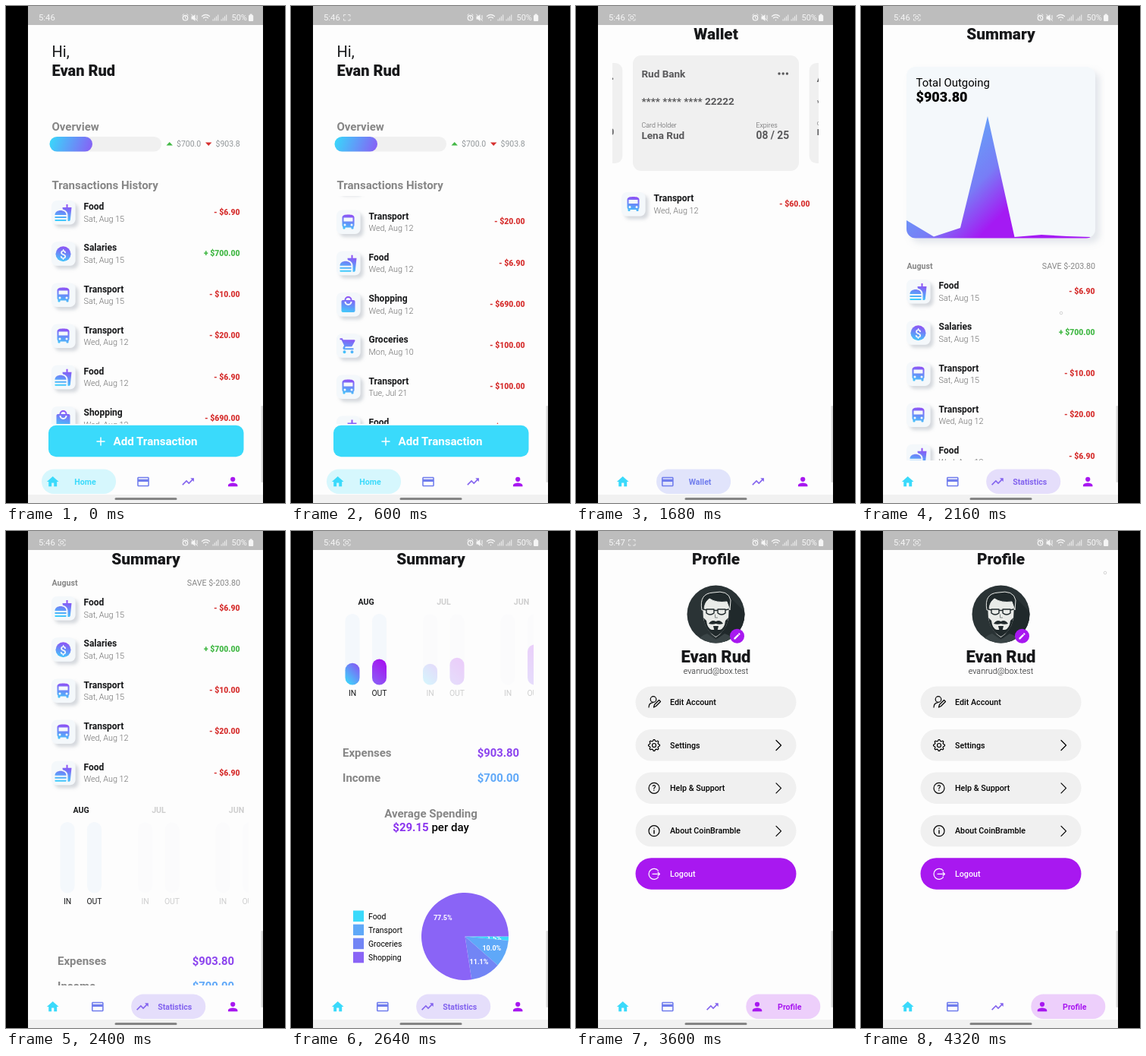
These frames come from a looping animation (368 by 654 pixels, 4.44 s). An HTML page:

```html
<!DOCTYPE html>
<html lang="en">
<head>
<meta charset="utf-8">
<title>Budget app walkthrough</title>
<style>
html, body { margin: 0; width: 100%; height: 100%; overflow: hidden; background: #000; }
svg { display: block; width: 368px; height: 654px; font-family: Roboto, sans-serif; }
text { white-space: pre; }
</style>
</head>
<body>
<svg viewBox="0 0 368 654">
  <defs>
    <linearGradient id="bar" gradientUnits="userSpaceOnUse" x1="57" y1="172" x2="114" y2="191.5"><stop stop-color="#36dcfb"/><stop offset="1" stop-color="#8a5cf5"/></linearGradient>
    <linearGradient id="glyph" gradientUnits="userSpaceOnUse" x1="14" y1="2" x2="10" y2="23"><stop stop-color="#8f4ff5"/><stop offset="1" stop-color="#3fcdfb"/></linearGradient>
    <linearGradient id="in" x1=".1" y1="1" x2=".8" y2="0"><stop stop-color="#3adcfb"/><stop offset="1" stop-color="#8459f4"/></linearGradient>
    <linearGradient id="out" x1=".1" y1="1" x2=".6" y2="0"><stop stop-color="#8a62f6"/><stop offset="1" stop-color="#a515f0"/></linearGradient>
    <linearGradient id="area" gradientUnits="userSpaceOnUse" x1="75" y1="225" x2="155" y2="305"><stop stop-color="#65a3f8"/><stop offset=".55" stop-color="#787df6"/><stop offset="1" stop-color="#a41af3"/></linearGradient>
    <filter id="soft" x="-30%" y="-30%" width="170%" height="170%"><feDropShadow dx="4" dy="4" stdDeviation="2.2" flood-color="#8f98a6" flood-opacity=".36"/></filter>
    <filter id="wide" x="-10%" y="-10%" width="125%" height="125%"><feDropShadow dx="6" dy="6" stdDeviation="4" flood-color="#93a3b5" flood-opacity=".25"/></filter>
    <clipPath id="homeClip"><rect x="48" y="250" width="272" height="300"/></clipPath>
    <clipPath id="rowClip"><rect x="48" y="52" width="272" height="180"/></clipPath>
    <clipPath id="viewClip"><rect x="48" y="52" width="274" height="546"/></clipPath>
    <clipPath id="chartClip"><rect x="60" y="80" width="249" height="225.5" rx="12"/></clipPath>
    <clipPath id="faceClip"><circle cx="184.5" cy="109.5" r="38"/></clipPath>
  </defs>
  <g id="scene"></g>
</svg>
<script>
const LOOP = 4440, STEP = 120;
const CYAN = '#3adafb', BLUE = '#5fa8f8', INDIGO = '#7285f5', VIOLET = '#8a64f6', PURPLE = '#a818f0';
const GRAY = '#868686', INK = '#17181a';
const USER = 'Evan Rud', PARTNER = 'Lena Rud';

const GLYPHS = {
  Home: 'M10 20v-6h4v6h5v-8h3L12 3 2 12h3v8z',
  Wallet: 'M20 4H4c-1.1 0-2 .9-2 2v12c0 1.1.9 2 2 2h16c1.1 0 2-.9 2-2V6c0-1.1-.9-2-2-2zm0 14H4v-6h16zm0-10H4V6h16z',
  Statistics: 'M16 6l2.3 2.3-4.9 4.9-4-4L2 16.6 3.4 18l6-6 4 4 6.3-6.3L22 12V6z',
  Profile: 'M12 12a4 4 0 1 0 0-8 4 4 0 0 0 0 8zm0 2c-2.7 0-8 1.3-8 4v2h16v-2c0-2.7-5.3-4-8-4z',
  Food: 'M18 23h1.7c.8 0 1.5-.6 1.6-1.5L23 5h-5V1h-2v4h-5l.3 2.4c1.7.5 3.3 1.3 4.3 2.3 1.4 1.4 2.4 2.9 2.4 5.3zM1 22v-1h15v1c0 .6-.4 1-1 1H2c-.6 0-1-.4-1-1zm15-7C16 7 1 7 1 15zM1 17h15v2H1z',
  Salaries: 'M12 2a10 10 0 1 0 0 20 10 10 0 0 0 0-20z',
  Transport: 'M4 16c0 .9.4 1.7 1 2.2V20c0 .6.4 1 1 1h1c.6 0 1-.4 1-1v-1h8v1c0 .6.4 1 1 1h1c.6 0 1-.4 1-1v-1.8c.6-.5 1-1.3 1-2.2V6c0-3.5-3.6-4-8-4s-8 .5-8 4zm3.5 1a1.5 1.5 0 1 1 0-3 1.5 1.5 0 0 1 0 3zm9 0a1.5 1.5 0 1 1 0-3 1.5 1.5 0 0 1 0 3zm1.5-6H6V6h12z',
  Groceries: 'M7 18a2 2 0 1 0 0 4 2 2 0 0 0 0-4zM1 2v2h2l3.6 7.6-1.4 2.4c-.7 1.3.3 3 1.8 3h12v-2H7.4l1-2h7.2c.7 0 1.4-.4 1.7-1l3.6-6.5A1 1 0 0 0 20 4H5.2l-.9-2zm16 16a2 2 0 1 0 0 4 2 2 0 0 0 0-4z',
  Shopping: 'M19 6h-2A5 5 0 0 0 7 6H5c-1.1 0-2 .9-2 2v12c0 1.1.9 2 2 2h14c1.1 0 2-.9 2-2V8c0-1.1-.9-2-2-2zm-7-3a3 3 0 0 1 3 3H9a3 3 0 0 1 3-3zm0 10a5 5 0 0 1-5-5h2a3 3 0 0 0 6 0h2a5 5 0 0 1-5 5z',
  edit: 'M3 17.2V21h3.8L17.8 9.9l-3.7-3.7zM20.7 7c.4-.4.4-1 0-1.4l-2.3-2.3c-.4-.4-1-.4-1.4 0l-1.9 1.8 3.8 3.8z'
};

const HISTORY = [
  ['Food', 'Sat, Aug 15', '- $6.90'], ['Salaries', 'Sat, Aug 15', '+ $700.00'],
  ['Transport', 'Sat, Aug 15', '- $10.00'], ['Transport', 'Wed, Aug 12', '- $20.00'],
  ['Food', 'Wed, Aug 12', '- $6.90'], ['Shopping', 'Wed, Aug 12', '- $690.00'],
  ['Groceries', 'Mon, Aug 10', '- $100.00'], ['Transport', 'Tue, Jul 21', '- $100.00'],
  ['Food', 'Mon, Jun 1', '- $100.00']
];
const CARDS = [
  { bank: 'Rud Bank', number: '11111', holder: USER, expires: '08 / 20', rows: [0, 2, 4, 6, 7, 8].map(i => HISTORY[i]) },
  { bank: 'Rud Bank', number: '22222', holder: PARTNER, expires: '08 / 25', rows: [['Transport', 'Wed, Aug 12', '- $60.00']] },
  { bank: 'Arl Bank', number: '33333', holder: PARTNER, expires: '08 / 22', rows: [] }
];
const MONTHS = [
  { name: 'AUG', bars: [51, 60], expenses: '$903.80', income: '$700.00', daily: '$29.15', shares: [1.5, 10, 11.1, 77.5] },
  { name: 'JUL', bars: [49, 63], expenses: '$892.00', income: '$600.00', daily: '$28.77', shares: [5.8, 11.2, 0, 83] },
  { name: 'JUN', bars: [0, 94] }
];
const NAV = [['Home', CYAN], ['Wallet', '#707ded'], ['Statistics', '#8262ee'], ['Profile', PURPLE]];

// Touch marker position by time
const TOUCHES = { 1080: [253, 210], 1200: [220, 190], 2160: [264, 404], 2280: [264, 300],
  2760: [250, 160], 3000: [201, 150], 3360: [289, 620], 4320: [322, 55] };

const seg = (t, from, to) => Math.min(1, Math.max(0, (t - from) / (to - from)));
const ease = p => p * p * (3 - 2 * p);
const text = (x, y, s, size, weight = 400, fill = INK, anchor = 'start') =>
  `<text x="${x}" y="${y}" font-size="${size}" font-weight="${weight}" fill="${fill}" text-anchor="${anchor}">${s}</text>`;
const rect = (x, y, w, h, r, fill, extra = '') =>
  `<rect x="${x}" y="${y}" width="${w}" height="${h}" rx="${r}" fill="${fill}" ${extra}/>`;
const circle = (x, y, r, fill, extra = '') => `<circle cx="${x}" cy="${y}" r="${r}" fill="${fill}" ${extra}/>`;
const path = (d, fill, extra = '') => `<path d="${d}" fill="${fill}" ${extra}/>`;
const line = (d, color, width = 1.2) => path(d, 'none', `stroke="${color}" stroke-width="${width}" stroke-linecap="round" stroke-linejoin="round"`);
const group = (body, attrs) => `<g ${attrs}>${body}</g>`;
const move = (body, x, y, scale = 1) => group(body, `transform="translate(${x} ${y}) scale(${scale})"`);
const clip = (body, id) => group(body, `clip-path="url(#${id})"`);
const icon = (name, x, y, fill, size) => move(path(GLYPHS[name], fill), x - size / 2, y - size / 2, size / 24);
const title = s => text(184.5, 44, s, 20.8, 900, INK, 'middle');

function row([name, date, amount], y) {
  return rect(60, y - 8, 31.5, 31.5, 7, '#f4f8fb', 'filter="url(#soft)"')
    + icon(name, 75.5, y + 8, 'url(#glyph)', 24)
    + (name === 'Salaries' ? text(75.5, y + 13.5, '$', 15.5, 500, '#f4f8fb', 'middle') : '')
    + text(102.5, y + 4.2, name, 12, 700)
    + text(102.5, y + 19.5, date, 10.8, 300, '#6d6d6d')
    + text(308.5, y + 10.8, amount, 10.4, 900, amount[0] === '+' ? '#43b846' : '#d6302f', 'end');
}
const rows = (items, y) => items.map((item, i) => row(item, y + i * 54.2)).join('');

function home(t) {
  const scroll = 150 * ease(seg(t, 120, 480));
  return text(60.5, 67, 'Hi,', 20) + text(60.5, 91.5, USER, 20, 900)
    + text(60.5, 164, 'Overview', 15, 700, GRAY)
    + rect(57.5, 172, 147.5, 19.5, 9.75, '#f0f0f0') + rect(57.5, 172, 56.5, 19.5, 9.75, 'url(#bar)')
    + path('M211.5 183.5l4.2-4.5 4.2 4.5z', '#43b846') + text(225, 185.3, '$700.0', 10.5, 400, '#919699')
    + path('M263 179.5h8.4l-4.2 4.5z', '#d6302f') + text(276.5, 185.3, '$903.8', 10.5, 400, '#919699')
    + text(60.5, 241, 'Transactions History', 15, 700, GRAY)
    + clip(move(rows(HISTORY, 264), 0, -scroll), 'homeClip')
    + rect(56, 551.7, 257.5, 41.5, 10, CYAN)
    + line('M120 573h10M125 568v10', '#fff', 1.5)
    + text(141.5, 578.3, 'Add Transaction', 15.1, 700, '#fff');
}

function bankCard(card, offset) {
  const dark = '#58585a';
  const body = rect(-109.5, -76, 219, 152, 11, '#f0f0f0') + (card
    ? text(-98, -47.5, card.bank, 13.5, 700, dark)
      + [83.5, 88.7, 93.9].map(x => circle(x, -52, 1.7, dark)).join('')
      + text(-98, -11.5, `**** **** **** ${card.number}`, 13.5, 700, dark)
      + text(-98, 18.5, 'Card Holder', 8.9, 300, dark) + text(-98, 33.5, card.holder, 13.5, 700, dark)
      + text(53, 18.5, 'Expires', 8.9, 300, dark) + text(53, 33.5, card.expires, 13.8, 700, dark)
    : '');
  return move(body, 184.5 + offset * 218.5, 141, 1 - 0.13 * Math.min(1, Math.abs(offset)));
}

function wallet(t) {
  const position = ease(seg(t, 1080, 1560));
  const cards = [null, ...CARDS].map((card, i) => bankCard(card, i - 1 - position)).join('');
  return title('Wallet') + clip(cards, 'rowClip') + rows(CARDS[Math.round(position)].rows, 253);
}

const outgoing = () => rect(60, 80, 249, 225.5, 12, '#f4f8fb', 'filter="url(#wide)"')
  + clip(path('M60 282L96 303.5 131 292 167 145 202.5 304 238 301 272 303 303 304V306H60z', 'url(#area)'), 'chartClip')
  + text(72.5, 106, 'Total Outgoing', 14.9, 400, '#000') + text(72.5, 125.5, '$903.80', 18, 900, '#000')
  + text(60.5, 345.5, 'August', 10.6, 700, GRAY) + text(309, 345.5, 'SAVE $-203.80', 10.7, 400, GRAY, 'end')
  + rows(HISTORY.slice(0, 5), 368);

function monthBars(month, x, selected, growth) {
  const bars = month.bars.map((full, i) => {
    const left = x - 27.5 + i * 35.5, h = full * growth;
    return rect(left, 109, 19, 93.5, 9.5, '#f4f8fc')
      + rect(left, 202.5 - h, 19, h, Math.min(9.5, h / 2), `url(#${['in', 'out'][i]})`)
      + text(left + 9.5, 216.5, ['IN', 'OUT'][i], 10.4, 400, INK, 'middle');
  }).join('');
  return group(text(x, 97, month.name, 10.6, 700, INK, 'middle') + bars, `opacity="${selected ? 1 : 0.2}"`);
}

function pie(shares) {
  const cx = 229.5, cy = 533.5, r = 57.5, total = shares.reduce((a, b) => a + b);
  const at = (a, d) => [cx + d * Math.cos(a), cy + d * Math.sin(a)];
  let angle = 0;
  return shares.map((share, i) => {
    if (!share) return '';
    const sweep = share / total * 2 * Math.PI, [lx, ly] = at(angle + sweep / 2, 38.5);
    const d = `M${cx} ${cy}L${at(angle, r)}A${r} ${r} 0 ${+(sweep > Math.PI)} 1 ${at(angle + sweep, r)}z`;
    angle += sweep;
    return path(d, [CYAN, BLUE, INDIGO, VIOLET][i]) + text(lx, ly + 3.2, share.toFixed(1) + '%', 9, 700, '#fff', 'middle');
  }).join('');
}

function breakdown(t) {
  const selected = t < 3120 ? 0 : 1, month = MONTHS[selected];
  const growth = seg(t, 2520, 2732), drag = -70 * Math.sin(Math.PI * seg(t, 2700, 3000));
  const bars = MONTHS.map((m, i) => monthBars(m, 99 + i * 102.5, i === selected, growth)).join('');
  const legend = ['Food', 'Transport', 'Groceries', 'Shopping'].map((name, i) =>
    rect(82, 499.5 + i * 18.1, 14, 14.5, 0, [CYAN, BLUE, INDIGO, VIOLET][i]) + text(102, 510.6 + i * 18.1, name, 10.4, 400, '#000')).join('');
  return clip(move(bars, drag, 0), 'rowClip')
    + text(68, 297, 'Expenses', 15, 700, GRAY) + text(301, 297, month.expenses, 14.8, 700, '#8b43ee', 'end')
    + text(68, 329.5, 'Income', 15, 700, GRAY) + text(301, 329.5, month.income, 14.8, 700, BLUE, 'end')
    + text(184.5, 377, 'Average Spending', 15, 700, GRAY, 'middle')
    + text(184.5, 394.5, `<tspan font-weight="700" fill="#8b35ee">${month.daily}</tspan> per day`, 15, 500, '#000', 'middle')
    + legend + pie(month.shares);
}

function statistics(t) {
  const slide = seg(t, 2280, 2520) * 548;
  return title('Summary') + clip(
    (slide < 548 ? move(outgoing(), 0, -slide) : '') + (slide ? move(breakdown(t), 0, 548 - slide) : ''), 'viewClip');
}

const avatar = () => circle(184.5, 109.5, 38, '#2a3335') + clip(
  path('M200 84L232 116 220 160 184 140z', '#20292b')
  + path('M158 150q2-11 15-15l11.500 8 11.500-8q13 4 15 15z', '#3a4446')
  + path('M167 96q0-13 17.500-13t17.500 13l-1 20q-4 16-16.500 24-12.500-8-16.500-24z', '#e9ebe8')
  + path('M166 104q-4-22 15-23 20-4 23 10l-1 13-4-11q-14 2-23-4-7 5-7 15z', '#20292b', 'stroke="#e9ebe8"')
  + path('M168 114l4 4q1 10 7 12h11q6-2 7-12l4-4q-2 17-16.500 25-14.500-8-16.500-25z', '#20292b')
  + path('M175 122q4-6 9.500-3 5.500-3 9.500 3-5 1.500-9.500 0-4.500 1.500-9.500 0z', '#20292b')
  + path('M181 125h7l-1.500 6h-4z', '#20292b')
  + line('M172 103h10v5q-5 4-10 0zM187 103h10v5q-5 4-10 0zM182 104.500h5M172 104l-4-1M197 104l4-1', '#20292b', 1.4)
  + line('M183.500 110v4h3', '#7b8281', 1), 'faceClip');

const gear = () => 'M' + Array.from({ length: 32 }, (_, i) => {
  const a = (i - 0.5) * Math.PI / 16, r = i % 4 < 2 ? 7.5 : 5.8;
  return [103 + r * Math.cos(a), 282 + r * Math.sin(a)].map(v => v.toFixed(2));
}).join('L') + 'z';
const ring = (y, color = '#000') => circle(103, y, 7, 'none', `stroke="${color}" stroke-width="1.200"`);

function profile() {
  const labels = ['Edit Account', 'Settings', 'Help &amp; Support', 'About CoinBramble', 'Logout'];
  const buttons = labels.map((label, i) => {
    const y = 204.6 + i * 56.4, last = i === 4;
    return rect(78.5, y, 212, 41.5, 20.75, last ? PURPLE : '#f0f0f0')
      + text(124, y + 24.6, label, 10.7, 500, last ? '#fff' : '#000')
      + (i && !last ? line(`M264 ${y + 14.5}l6.500 6.500-6.500 6.500`, '#000') : '');
  }).join('');
  return title('Profile') + avatar()
    + circle(212.5, 138.3, 9.5, PURPLE) + icon('edit', 212.5, 138.3, '#fff', 11)
    + text(184.5, 172.5, USER, 22, 900, INK, 'middle')
    + text(184.5, 187.5, 'evanrud@box.test', 10.8, 300, INK, 'middle') + buttons
    + circle(102, 221.5, 3.8, 'none', 'stroke="#000" stroke-width="1.2"')
    + line('M96 232q0-5.500 5-6.200M102.500 232l1-3.500 6-6 2 2-6 6z', '#000')
    + line(gear(), '#000') + circle(103, 282, 2.5, 'none', 'stroke="#000" stroke-width="1.2"')
    + ring(338.3) + text(103, 342, '?', 10, 500, '#000', 'middle')
    + ring(394.7) + line('M103 394v4M103 391.200v.1', '#000', 1.4)
    + line('M108.500 447a7 7 0 1 0 0 8.700M101 451.300h9.500m-2.500-2.500l2.500 2.500-2.500 2.500', '#fff');
}

function navigation(weights) {
  let x = 47;
  return NAV.map(([name, color], i) => {
    const w = weights[i], left = x;
    x += 59.1 + 60.2 * w;
    return (w ? group(rect(left, 609.5, 40 + 58 * w, 32.5, 16.25, color, 'opacity=".2"')
      + text(left + 57.5, 630, name, 10.6, 700, color, 'middle'), `opacity="${w}"`) : '')
      + icon(name, left + 14.7, 626, color, 18.8);
  }).join('');
}

function statusBar(t) {
  const i = t / STEP, white = '#f5f5f5';
  const dotOn = i >= 35 ? i === 36 : (i + (i > 25)) % 2 === 0;
  const bars = x => path(`M${x} 19.500h1.200v-2h-1.200zm2.200 0h1.200v-4h-1.200zm2.200 0h1.200v-6h-1.200zm2.200 0h1.200v-8h-1.200z`, white, 'opacity=".8"');
  return rect(29, 0, 310, 25, 0, '#bdbdbd')
    + text(43, 19.3, t < 3000 ? '5:46' : '5:47', 11.3, 400, white)
    + (i ? line('M69.500 13.500v-2h2.500M75.500 11.500h2.500v2M78 17v2h-2.500M72 19h-2.500v-2', white, 0.8) : '')
    + (i && dotOn ? circle(73.7, 15.2, 2, 'none', `stroke="${white}"`) : '')
    + circle(236.5, 15.7, 3.2, 'none', `stroke="${white}" stroke-width="1.3"`)
    + line('M236.500 14v2l1.300.700M232.800 12l1.500-1.300M240.200 12l-1.500-1.300', white, 1)
    + path('M244.500 13.500h2l3-2.500v9l-3-2.500h-2z', white) + line('M244.500 11l8 8.500M252 12.500v5', white, 1)
    + line('M258.500 13.500q5-4 10 0M260.500 15.800q3-2.500 6 0M263.500 18.500v.2', white, 1.3)
    + bars(272.5) + bars(283.5) + text(297.5, 19.3, '50%', 11, 400, white)
    + rect(320, 12, 6.2, 8, 1, white) + rect(321.5, 10.5, 3.2, 2, 0.5, white);
}

function draw(t) {
  const current = [600, 1680, 3360].reduce((sum, start) => sum + seg(t, start, start + 240), 0);
  const weights = NAV.map((_, i) => Math.max(0, 1 - Math.abs(current - i)));
  const pages = [home, wallet, statistics, profile].map((page, i) =>
    weights[i] ? group(page(t), `opacity="${weights[i]}"`) : '').join('');
  const touch = TOUCHES[t];
  return rect(29, 0, 310, 654, 0, '#fdfdfd') + pages + navigation(weights) + statusBar(t)
    + rect(29, 643, 310, 11, 0, '#f1f1f1') + rect(143.5, 647, 82, 3, 1.5, '#858585')
    + rect(336.5, 526, 2.5, 101, 1.25, '#d9d9d9')
    + (touch ? circle(...touch, 1.8, 'none', 'stroke="#c9c9c9" stroke-width=".8"') : '');
}

const scene = document.getElementById('scene');
const begin = performance.now();
let shown = -1;
function tick() {
  const t = Math.floor((performance.now() - begin) % LOOP / STEP) * STEP;
  if (t !== shown) scene.innerHTML = draw(shown = t);
  requestAnimationFrame(tick);
}
tick();
</script>
</body>
</html>
```
